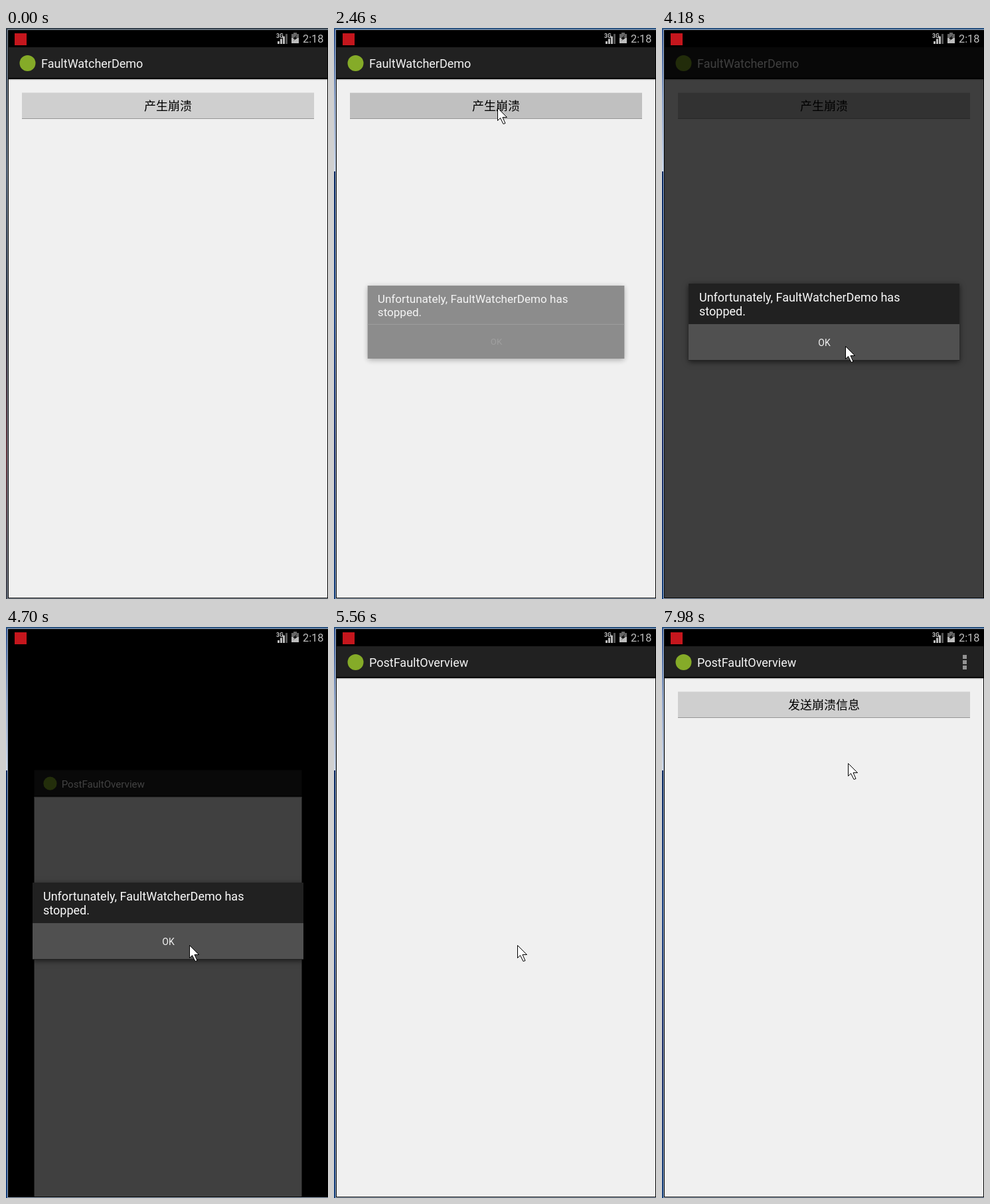
Animation, 485 px wide and 860 px high, one loop 8000 ms. Source, as an HTML page with a canvas:

```html
<!DOCTYPE html>
<html lang="en">
<head>
<meta charset="utf-8">
<title>Crash dialog</title>
<style>
html, body { margin: 0; width: 485px; height: 860px; overflow: hidden; background: #000; }
canvas { display: block; }
</style>
</head>
<body>
<canvas id="stage" width="485" height="860"></canvas>
<script>
const LOOP = 8000;
const stage = document.getElementById('stage').getContext('2d');
const layer = document.createElement('canvas');
layer.width = 485;
layer.height = 860;
const overlay = layer.getContext('2d');

const APP = 'FaultWatcherDemo';
const REPORT = 'PostFaultOverview';
const LATIN = 'Roboto, sans-serif';
const CJK = '"Noto Sans CJK SC", "Noto Sans CJK", sans-serif';

// Places the hand stops or turns
const STOPS = [
  { at: 560, x: 438, y: 334 }, { at: 1380, x: 246, y: 129 },
  { at: 1680, x: 246, y: 120 }, { at: 2580, x: 246, y: 120 },
  { at: 2780, x: 248, y: 139 }, { at: 3780, x: 276, y: 479 },
  { at: 5680, x: 276, y: 479 }, { at: 5780, x: 273, y: 479 },
  { at: 6180, x: 273, y: 482 }, { at: 7980, x: 280, y: 205 }
];

const mix = (a, b, p) => a + (b - a) * p;
const progress = (t, from, to) => Math.min(1, Math.max(0, (t - from) / (to - from)));
// The pointer is refreshed every 100 ms
const held = t => Math.floor((t - 80) / 100) * 100 + 80;

function pointerAt(t) {
  const next = STOPS.find(stop => stop.at > t) || STOPS[STOPS.length - 1];
  const last = STOPS[Math.max(0, STOPS.indexOf(next) - 1)];
  const p = progress(t, last.at, next.at);
  return [Math.round(mix(last.x, next.x, p)), Math.round(mix(last.y, next.y, p))];
}

function dimAt(t) {
  return 0.6 * (progress(t, 2480, 2780) - progress(t, 5220, 5560));
}

function rect(c, x, y, w, h, fill) {
  c.fillStyle = fill;
  c.fillRect(x, y, w, h);
}

function polygon(c, points, fill) {
  c.beginPath();
  points.forEach(([x, y]) => c.lineTo(x, y));
  c.closePath();
  c.fillStyle = fill;
  c.fill();
}

function text(c, str, x, y, size, fill, align = 'left', family = LATIN, weight = 400) {
  c.font = `${weight} ${size}px ${family}`;
  c.textAlign = align;
  c.fillStyle = fill;
  c.fillText(str, x, y);
}

function fade(c, y0, y1, ...colors) {
  const g = c.createLinearGradient(0, y0, 0, y1);
  colors.forEach((color, i) => g.addColorStop(i / (colors.length - 1), color));
  return g;
}

function zoom(c, scale, x, y) {
  c.translate(x, y);
  c.scale(scale, scale);
  c.translate(-x, -y);
}

function drawDesktop(c, t) {
  const late = t >= 1480;
  if (late) {
    rect(c, 0, 0, 485, 216, fade(c, 0, 216, '#2c4f8c', '#8ea3c8', '#d0daea'));
    rect(c, 0, 216, 485, 644, fade(c, 216, 860, '#0b2a63', '#1c4384', '#1d2f68', '#15407c'));
  } else {
    rect(c, 0, 0, 485, 860, fade(c, 0, 860, '#2a3644', '#46566c', '#1c2638', '#60343c', '#3a404c'));
  }
  rect(c, 0, 0, 485, 2, late ? '#29527f' : '#34404c');
  rect(c, 2, 2, 483, 858, late ? '#9fb0c6' : '#8d98a4');
  rect(c, 3, 3, 482, 856, '#000');
}

function drawStatusBar(c) {
  rect(c, 4, 3, 480, 26, '#000');
  rect(c, 13, 8, 18, 18, '#c5161d');
  text(c, '3G', 407, 15, 8.5, '#c8c8c8', 'left', LATIN, 700);
  for (let i = 0; i < 4; i++) {
    const h = 4 + i * 3.7;
    rect(c, 409 + i * 4, 24 - h, 3, h, i < 3 ? '#bdbdbd' : '#555');
  }
  rect(c, 433, 7, 5, 3, '#666');
  rect(c, 430, 9, 11, 6, '#666');
  rect(c, 430, 15, 11, 8, '#bdbdbd');
  polygon(c, [[439, 10], [432, 16], [435, 17], [432, 20], [439, 15], [436, 14]], '#111');
  text(c, '2:18', 447, 22, 16.3, '#bebebe');
}

function drawWindow(c, title) {
  rect(c, 4, 29, 480, 48, '#212121');
  rect(c, 4, 75, 480, 2, '#050505');
  rect(c, 4, 77, 480, 781, '#f0f0f0');
  rect(c, 4, 77, 480, 2, fade(c, 77, 79, '#aaa', '#eee'));
  c.beginPath();
  c.arc(32.5, 53, 12, 0, Math.PI * 2);
  c.fillStyle = '#85ab28';
  c.fill();
  text(c, title, 53, 60, 18, '#f4f4f4');
}

function drawButton(c, label, fill) {
  rect(c, 24, 97, 440, 40, fill);
  rect(c, 24, 97, 440, 1, '#dedede');
  rect(c, 24, 136, 440, 1, '#969696');
  text(c, label, 244, 124, 18, '#000', 'center', CJK);
}

function drawMain(c, t) {
  drawWindow(c, APP);
  drawButton(c, '产生崩溃', t < 1480 ? '#cfcfcf' : '#c0c0c0');
}

function drawReport(c, t) {
  drawWindow(c, REPORT);
  if (t < 6400) return;
  drawButton(c, '发送崩溃信息', '#cfcfcf');
  for (let i = 0; i < 3; i++) rect(c, 453, 42 + i * 8, 6, 6, '#929292');
}

function drawDialog(c, t) {
  const shown = progress(t, 2270, 2670) - progress(t, 5100, 5380);
  if (shown <= 0) return;
  overlay.clearRect(0, 0, 485, 860);
  overlay.save();
  zoom(overlay, mix(0.9, 1, shown), 244, 443);
  overlay.shadowColor = 'rgba(0,0,0,.6)';
  overlay.shadowBlur = 8;
  overlay.shadowOffsetY = 2;
  rect(overlay, 40, 385, 408, 116, '#212121');
  overlay.shadowColor = 'transparent';
  rect(overlay, 40, 446, 408, 1, '#484848');
  if (t >= 3880) rect(overlay, 40, 446, 408, 54, t < 5100 ? '#505050' : '#208920');
  text(overlay, `Unfortunately, ${APP} has`, 56, 412, 18, '#fafafa');
  text(overlay, 'stopped.', 56, 433, 18, '#fafafa');
  text(overlay, 'OK', 244.5, 479, 14, t < 3300 ? '#484848' : '#f4f4f4', 'center');
  overlay.restore();
  c.globalAlpha = shown;
  c.drawImage(layer, 0, 0);
  c.globalAlpha = 1;
}

function drawPointer(c, t) {
  if (t < 500) return;
  const [x, y] = pointerAt(held(t));
  c.save();
  c.translate(x + 0.5, y + 0.5);
  polygon(c, [[0, 0], [0, 19], [4, 15], [8.5, 24], [11.5, 23], [7.5, 14], [14, 14]], '#fff');
  c.strokeStyle = '#000';
  c.stroke();
  c.restore();
}

function drawApp(c, t) {
  const opening = t >= 4420;
  const opacity = opening ? progress(t, 4420, 4840) : 1 - progress(t, 4050, 4420);
  const shade = alpha => rect(c, 4, 29, 480, 829, `rgba(0,0,0,${alpha})`);
  c.save();
  c.beginPath();
  c.rect(4, 29, 480, 829);
  c.clip();
  c.save();
  if (opening) {
    zoom(c, mix(0.8, 1, progress(t, 4686, 4762)), 244, 1191);
    drawReport(c, t);
  } else {
    drawMain(c, t);
  }
  c.restore();
  shade(1 - opacity);
  shade(dimAt(t));
  drawDialog(c, t);
  c.restore();
}

function render(t) {
  drawDesktop(stage, t);
  drawStatusBar(stage);
  drawApp(stage, t);
  drawPointer(stage, t);
}

const start = performance.now();
function loop() {
  render((performance.now() - start) % LOOP);
  requestAnimationFrame(loop);
}
loop();
</script>
</body>
</html>
```
